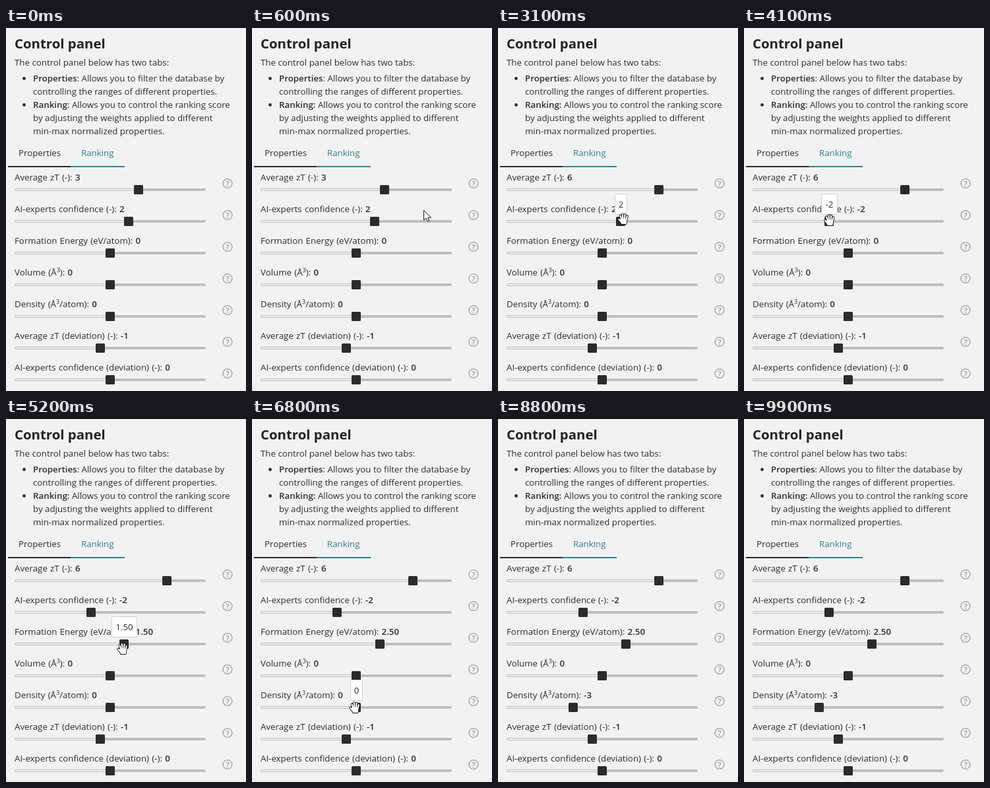
An HTML page that plays this animation: 364x550 px, repeating every 10 s.

```html
<!DOCTYPE html>
<html lang="en">
<head>
<meta charset="utf-8">
<title>Control panel</title>
<style>
  html, body { margin: 0; width: 100%; height: 100%; overflow: hidden; background: #f2f2f2; }
  svg { display: block; width: 364px; height: 550px; }
  text { font: 13.3px "Open Sans", "Noto Sans", sans-serif; fill: #2d2d2d; white-space: pre; }
  .bold { font-weight: 600; }
  .title { font-size: 20.4px; font-weight: 700; fill: #222; }
  .field { word-spacing: 0.8px; }
  .sup { font-size: 9px; }
  .help { font-size: 11.5px; fill: #999; font-weight: 600; text-anchor: middle; }
  .tip text { text-anchor: middle; }
</style>
</head>
<body>
<svg id="stage" viewBox="0 0 364 550"></svg>
<script>
const LOOP = 10000, STEP = 100;
const MID = 157.5, UNIT = 14.45;
const stage = document.getElementById('stage');

function add(parent, tag, attrs, content) {
  const el = document.createElementNS('http://www.w3.org/2000/svg', tag);
  for (const k in attrs) el.setAttribute(k, attrs[k]);
  if (content !== undefined) el.textContent = content;
  parent.appendChild(el);
  return el;
}
const label = (x, y, content, attrs) => add(stage, 'text', { x, y, ...attrs }, content);
const rect = (parent, x, y, width, height, fill, more) =>
  add(parent, 'rect', { x, y, width, height, fill, ...more });

// Heading and description
label(13, 31, 'Control panel', { class: 'title' });
label(13, 57, 'The control panel below has two tabs:');
function bullet(y, head, lines) {
  add(stage, 'circle', { cx: 27.5, cy: y - 4.5, r: 2.4, fill: '#2d2d2d' });
  lines.forEach((line, i) => {
    const row = label(41, y + i * 20, '');
    if (i === 0) add(row, 'tspan', { class: 'bold' }, head);
    add(row, 'tspan', {}, line);
  });
}
bullet(81, 'Properties', [': Allows you to filter the database by',
  'controlling the ranges of different properties.']);
bullet(121, 'Ranking:', [' Allows you to control the ranking score',
  'by adjusting the weights applied to different', 'min-max normalized properties.']);

// Tabs
label(19, 194, 'Properties');
label(114, 194, 'Ranking', { style: 'fill:#347f8c' });
rect(stage, 180, 210, 171, 1, '#eeeeee');
rect(stage, 3, 209, 95, 2, '#2b2b2b');
rect(stage, 98, 209, 82, 2, '#347f8c');

// Sliders: "^" marks the superscript; a drag is [start, end] in ms
const rows = [
  { name: 'Average zT (-): ', value: 3, drag: [900, 1400] },
  { name: 'AI-experts confidence (-): ', value: 2, drag: [3400, 4200] },
  { name: 'Formation Energy (eV/atom): ', value: 0, drag: [4800, 5700], step: 0.5 },
  { name: 'Volume (Å^): ', value: 0 },
  { name: 'Density (Å^/atom): ', value: 0, drag: [6900, 7700] },
  { name: 'Average zT (deviation) (-): ', value: -1 },
  { name: 'AI-experts confidence (deviation) (-): ', value: 0 }
];
rows.forEach((row, i) => {
  const y = row.y = 245 + i * 48;
  const text = label(13, y - 14, '', { class: 'field' });
  const [before, after] = row.name.split('^');
  add(text, 'tspan', {}, before);
  if (after) {
    add(text, 'tspan', { class: 'sup', dy: -5 }, '3');
    add(text, 'tspan', { dy: 5 }, after);
  }
  row.text = add(text, 'tspan', { class: 'bold' });
  rect(stage, 13, y - 2, 290, 4, '#bebebe', { rx: 2 });
  row.rail = rect(stage, 14, y - 1, 100, 2, '#efefef', { rx: 1 });
  row.thumb = rect(stage, 0, y - 7, 14, 14, '#2b2b2b', { rx: 1.5 });
  add(stage, 'circle', { cx: 336, cy: y - 9.5, r: 6.9, fill: 'none', stroke: '#a2a2a2', 'stroke-width': 1.4 });
  label(336, y - 5.4, '?', { class: 'help' });
});

// Tooltip and pointer
const tip = add(stage, 'g', { class: 'tip' });
const tipBox = rect(tip, 0, -41.5, 18, 31, '#fff', { rx: 2, stroke: '#d0d0d0' });
const tipText = add(tip, 'text', { x: 0, y: -21.5 });
const hand = add(stage, 'g', { 'stroke-linecap': 'round', 'stroke-linejoin': 'round' });
const palm = 'M-3.5 1H4.5L3.8 7H-2.3Z';
const fingers = 'M-4.5-4.5L-2.5 1M-1.2-6.8L-.6 0M2.5-6.3L2 0M5.8-3.8L4.3 2M-6.6 .8L-3 5';
for (const [color, width] of [['#111', 4], ['#fff', 2.2]])
  add(hand, 'path', { d: palm + fingers, fill: color, stroke: color, 'stroke-width': width });
const arrow = add(stage, 'path', { d: 'M0 0V15L3.5 11.8 6 17 8.3 16 6 11H11Z', fill: '#fff', stroke: '#111' });

// Pointer stops: time, x, y
const path = [
  [300, 374, 330], [800, 199, 247], [900, 199, 247], [1400, 241, 248], [2000, 241, 248],
  [2800, 190, 289], [3400, 190, 289], [4200, 127, 291], [4300, 127, 291],
  [4700, 157, 346], [4800, 157, 346], [5200, 177, 348], [5700, 192, 347], [5900, 192, 347],
  [6500, 156, 437], [6900, 156, 437], [7700, 112, 439], [8100, 112, 439], [8700, 374, 425]
];
function pointer(t) {
  const i = path.findIndex(p => p[0] > t);
  if (i < 1) return { x: -99, y: -99 };
  const [t0, x0, y0] = path[i - 1], [t1, x1, y1] = path[i];
  const u = (t - t0) / (t1 - t0), k = u * u * (3 - 2 * u);
  return { x: x0 + (x1 - x0) * k, y: y0 + (y1 - y0) * k };
}
function valueAt(row, t) {
  if (!row.drag || t < row.drag[0]) return row.value;
  const step = row.step || 1;
  const x = pointer(Math.min(t, row.drag[1])).x;
  return Math.round((x - MID) / UNIT / step) * step + 0;
}
const show = (el, on) => el.setAttribute('visibility', on ? 'visible' : 'hidden');

function draw(t) {
  const p = pointer(t);
  let onRail = false, tipOn = false;
  for (const row of rows) {
    const v = valueAt(row, t), x = MID + v * UNIT;
    const shown = row.step && v ? v.toFixed(2) : String(v);
    row.text.textContent = shown;
    row.rail.setAttribute('width', x - 14);
    row.thumb.setAttribute('x', Math.round(x - 7));
    const near = Math.abs(p.y - row.y) < 9;
    const held = row.drag && t >= row.drag[0] && t <= row.drag[1];
    if (near && p.x > 10 && p.x < 306) onRail = true;
    if (held || near && Math.abs(p.x - x) < 9) {
      const w = shown.length > 2 ? 38 : shown.length > 1 ? 24 : 18;
      tipOn = true;
      tipBox.setAttribute('x', -w / 2);
      tipBox.setAttribute('width', w);
      tipText.textContent = shown;
      tip.setAttribute('transform', `translate(${Math.round(x) + 0.5} ${row.y})`);
    }
  }
  show(tip, tipOn);
  show(hand, onRail);
  show(arrow, !onRail);
  for (const el of [hand, arrow]) el.setAttribute('transform', `translate(${p.x} ${p.y})`);
}

const start = performance.now();
function tick() {
  const t = (performance.now() - start) % LOOP;
  draw(Math.floor(t / STEP) * STEP);
  requestAnimationFrame(tick);
}
tick();
</script>
</body>
</html>
```
